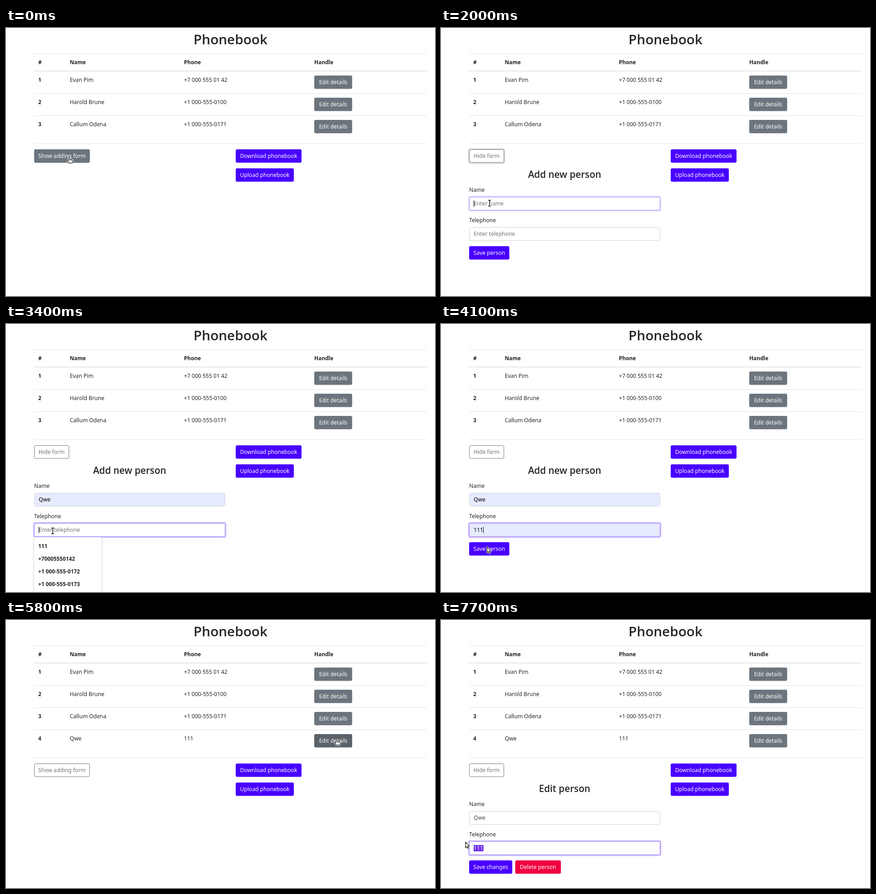
Recreate the animation shown at these times as an HTML page with a canvas. Size 945 by 592 pixels, loop 8 s.

```html
<!DOCTYPE html>
<html lang="en">
<head>
<meta charset="utf-8">
<title>Phonebook</title>
<style>
html, body { margin: 0; width: 100%; height: 100%; overflow: hidden; background: #fff; }
canvas { display: block; width: 945px; height: 592px; }
</style>
</head>
<body>
<canvas id="stage"></canvas>
<script>
const W = 945, H = 592, LOOP = 8000, ROW = 49;
const INK = '#212529', GREY = '#6c757d', BLUE = '#4800ff', RED = '#f00040';
const BODY = '12.1px "Noto Sans", "Open Sans", sans-serif';
const BOLD = 'bold 11.8px "Noto Sans", "Open Sans", sans-serif';
const heading = size => `600 ${size}px "Open Sans", "Noto Sans", sans-serif`;

const people = [
  ['Evan Pim', '+7 000 555 01 42'],
  ['Harold Brune', '+1 000-555-0100'],
  ['Callum Odena', '+1 000-555-0171'],
  ['Qwe', '111']
];
const nameHints = ['Callum Odena', 'Qwe', 'Harold Brune', 'We', 'Callum Odena111'];
const phoneHints = ['111', '+70005550142', '+1 000-555-0172', '+1 000-555-0173', '+1 000-555-0171'];

// Cursor: time, shape, hot spot
const pointer = [
  [0, 'hand', 139, 286], [100, 'hand', 138, 284], [200, 'hand', 137, 282], [300, 'hand', 136, 282],
  [1400, 'hand', 135.5, 285], [1500, 'arrow', 131, 300], [1600, 'arrow', 126, 327],
  [1700, 'arrow', 120, 352], [1800, 'beam', 114, 378], [1900, 'beam', 108, 386],
  [2000, 'beam', 107, 387], [2300, 'arrow', 106, 421], [2400, 'arrow', 106, 445],
  [2900, 'beam', 106, 450], [3000, 'beam', 104, 455], [3200, 'beam', 103, 457],
  [3600, 'arrow', 103, 485], [4000, 'arrow', 102, 488], [4100, 'arrow', 101, 492],
  [4200, 'arrow', 101, 495], [4400, 'hand', 101, 495], [4800, 'arrow', 101, 495],
  [5200, 'arrow', 150, 452], [5300, 'arrow', 215, 396], [5500, 'arrow', 648, 270],
  [5700, 'hand', 712, 266], [5800, 'hand', 728, 264], [6600, 'arrow', 287, 431],
  [6800, 'arrow', 232, 474], [6900, 'beam', 180, 500], [7000, 'beam', 150, 506],
  [7400, 'arrow', 48, 492], [7600, 'arrow', 51, 491], [7700, 'arrow', 53.5, 490]
];
const tracks = {
  toggleFill: [[0, 1], [1500, .5], [1600, 0]],
  toggleRing: [[0, 0], [1000, .5], [1100, 1], [2000, .5], [2100, 0]],
  nameRing: [[0, 0], [2000, .5], [2100, 1], [3200, .5], [3300, 0]],
  phoneRing: [[0, 0], [3200, .5], [3300, 1], [4700, 0], [7200, .7], [7400, 1]],
  editRing: [[0, 0], [6000, .5], [6100, 1], [7200, .5], [7400, 0]],
  editColor: [[0, GREY], [5700, '#636b72'], [5800, '#5a6268'], [6000, '#545b62'], [6400, '#5a6268'], [6600, GREY]],
  form: [[0, ''], [1100, 'add'], [4700, ''], [6100, 'edit']]
};

const canvas = document.getElementById('stage');
const ctx = canvas.getContext('2d');
const dpr = window.devicePixelRatio || 1;
canvas.width = W * dpr;
canvas.height = H * dpr;

const held = (keys, t) => keys.reduce((last, key) => key[0] <= t ? key : last);
const value = (name, t) => held(tracks[name], t)[1];
const between = (t, a, b) => t >= a && t < b;

function text(str, x, y, font = BODY, color = INK, align = 'left') {
  ctx.font = font;
  ctx.fillStyle = color;
  ctx.textAlign = align;
  ctx.fillText(str, x, y);
}

function rect(x, y, w, h, color) {
  ctx.fillStyle = color;
  ctx.fillRect(x, y, w, h);
}

function rounded(x, y, w, h, r, fill, stroke) {
  ctx.beginPath();
  ctx.roundRect(x, y, w, h, r);
  if (fill) { ctx.fillStyle = fill; ctx.fill(); }
  if (stroke) { ctx.strokeStyle = stroke; ctx.lineWidth = 1; ctx.stroke(); }
}

function button(label, x, y, w, color, ring = 0) {
  if (ring) rounded(x - 2.4, y - 2.4, w + 4.8, 34.3, 5, `rgba(108,117,125,${ring / 2})`);
  rounded(x, y, w, 29.5, 3.2, color);
  text(label, x + w / 2, y + 19, BODY, '#fff', 'center');
}

function toggle(label, y, w, fill, ring) {
  if (ring) rounded(59.6, y - 2.4, w + 4.8, 34.3, 5, `rgba(108,117,125,${ring / 2})`);
  rounded(62.5, y + .5, w - 1, 28.5, 3, '#fff', GREY);
  ctx.globalAlpha = fill;
  rounded(62, y, w, 29.5, 3.2, GREY);
  ctx.globalAlpha = 1;
  text(label, 62 + w / 2, y + 19, BODY, fill ? '#fff' : GREY, 'center');
}

function field(y, f) {
  if (f.ring) rounded(59.6, y - 2.4, 425.8, 34.8, 5, `rgba(72,0,255,${.25 * f.ring})`);
  rounded(62.5, y + .5, 420, 29, 3, f.auto ? '#e7ebff' : '#fff', f.ring > .4 ? '#a283ff' : '#ced4da');
  if (f.selected) rect(72, y + 8, 21.5, 14, '#6c2cf4');
  const color = f.selected ? '#fff' : f.auto ? '#000' : f.text ? '#495057' : GREY;
  text(f.text || f.hint, 72, y + 19, BODY, color);
  if (f.caret) rect(f.caret, y + 8, 1, 14, '#000');
}

function hints(list, y, active) {
  ctx.save();
  ctx.shadowColor = 'rgba(0,0,0,.35)';
  ctx.shadowBlur = 3 * dpr;
  ctx.shadowOffsetY = dpr;
  rounded(61.5, y, 149.5, 152.5, 2, '#fff');
  ctx.restore();
  list.forEach((item, i) => {
    const top = y + 6 + i * 28;
    if (i === active) rect(61.5, top, 149.5, 28, '#e8e8eb');
    text(item, 71, top + 18, BOLD);
  });
}

function table(t, rows) {
  text('Phonebook', 494.5, 36, heading(29.7), INK, 'center');
  rect(62, 56, 865, 1, '#dee2e6');
  rect(62, 94.4, 865, 1.6, '#dee2e6');
  [['#', 71], ['Name', 140.5], ['Phone', 392], ['Handle', 679]]
    .forEach(([label, x]) => text(label, x, 80, BOLD));
  people.slice(0, rows).forEach(([name, phone], i) => {
    const y = 95 + i * ROW;
    if (i) rect(62, y, 865, 1, '#dee2e6');
    text(i + 1, 71, y + 24, BOLD);
    text(name, 140.5, y + 24);
    text(phone, 392, y + 24);
    const last = i === 3;
    button('Edit details', 679, y + 10, 83.5,
      last ? value('editColor', t) : GREY, last ? value('editRing', t) : 0);
  });
}

function form(t, mode, dy) {
  const edit = mode === 'edit';
  const picked = t >= 2400, phonePicked = t >= 3600;
  const preview = between(t, 2300, 2400) ? nameHints[0] : picked ? 'Qwe' : '';
  text(edit ? 'Edit person' : 'Add new person', 272.3, 331 + dy, heading(20.7), INK, 'center');
  text('Name', 62, 362 + dy);
  text('Telephone', 62, 429 + dy);
  field(373 + dy, {
    hint: 'Enter name',
    text: preview,
    auto: !edit && t >= 2300,
    ring: value('nameRing', t),
    caret: between(t, 2000, 2900) ? 72 : between(t, 2900, 3200) ? 99 : 0
  });
  field(440 + dy, {
    hint: 'Enter telephone',
    text: phonePicked ? '111' : '',
    auto: !edit && phonePicked,
    ring: value('phoneRing', t),
    selected: t >= 7400,
    caret: between(t, 3200, 4000) ? 72 : between(t, 4000, 4700) || between(t, 7200, 7400) ? 93 : 0
  });
  if (edit) {
    button('Save changes', 62, 531, 95, BLUE);
    button('Delete person', 163.5, 531, 100.5, RED);
  } else {
    button('Save person', 62, 482, 88.5, t >= 4400 ? '#3d00d9' : BLUE);
  }
  if (between(t, 2100, 2900)) hints(nameHints, 404, t >= 2400 ? 1 : t >= 2300 ? 0 : -1);
  if (between(t, 3300, 4000)) hints(phoneHints, 471, t >= 3600 ? 0 : -1);
}

const shapes = {
  arrow: new Path2D('M.5 .5V13L3.4 10.4 5.2 14.5 7.2 13.6 5.4 9.6H9.2Z'),
  hand: new Path2D('M-1.4 1Q0-1.2 1.4 1V4.2L7 5Q8.6 5.4 8.4 7V9L7 12.4H-.2L-3.8 7.6Q-4 5.6-2.6 6L-1.4 7Z'),
  beam: new Path2D('M-3-6.5H-1Q0-6.5 0-5.5Q0-6.5 1-6.5H3M0-5.5V5.5M-3 6.5H-1Q0 6.5 0 5.5Q0 6.5 1 6.5H3')
};

function cursor(t) {
  const [, kind, x, y] = held(pointer, t);
  const shape = shapes[kind];
  ctx.save();
  ctx.translate(x, y);
  ctx.lineJoin = 'round';
  ctx.strokeStyle = '#fff';
  ctx.lineWidth = 3;
  ctx.stroke(shape);
  if (kind !== 'beam') {
    ctx.fillStyle = '#fff';
    ctx.fill(shape);
  }
  ctx.strokeStyle = '#111';
  ctx.lineWidth = kind === 'beam' ? 1.5 : 1.2;
  ctx.stroke(shape);
  if (kind === 'hand') {
    ctx.lineWidth = .8;
    ctx.stroke(new Path2D('M1.4 4V7M3.8 5V7M6 5V7'));
  }
  ctx.restore();
}

function draw(t) {
  const mode = value('form', t);
  const saved = t >= 4700;
  const dy = saved ? ROW : 0;
  ctx.setTransform(dpr, 0, 0, dpr, 0, 0);
  rect(0, 0, W, H, '#fff');
  table(t, saved ? 4 : 3);
  rect(62, 255 + dy - (saved ? .2 : .2), 865, 1, '#e3e4e5');
  toggle(mode ? 'Hide form' : 'Show adding form', 268 + dy, mode ? 77 : 122.5,
    value('toggleFill', t), value('toggleRing', t));
  button('Download phonebook', 506, 268 + dy, 145, BLUE);
  button('Upload phonebook', 506, 310 + dy, 128, BLUE);
  if (mode) form(t, mode, dy);
  cursor(t);
}

const start = performance.now();
function tick() {
  draw((performance.now() - start) % LOOP);
  requestAnimationFrame(tick);
}
tick();
</script>
</body>
</html>
```
